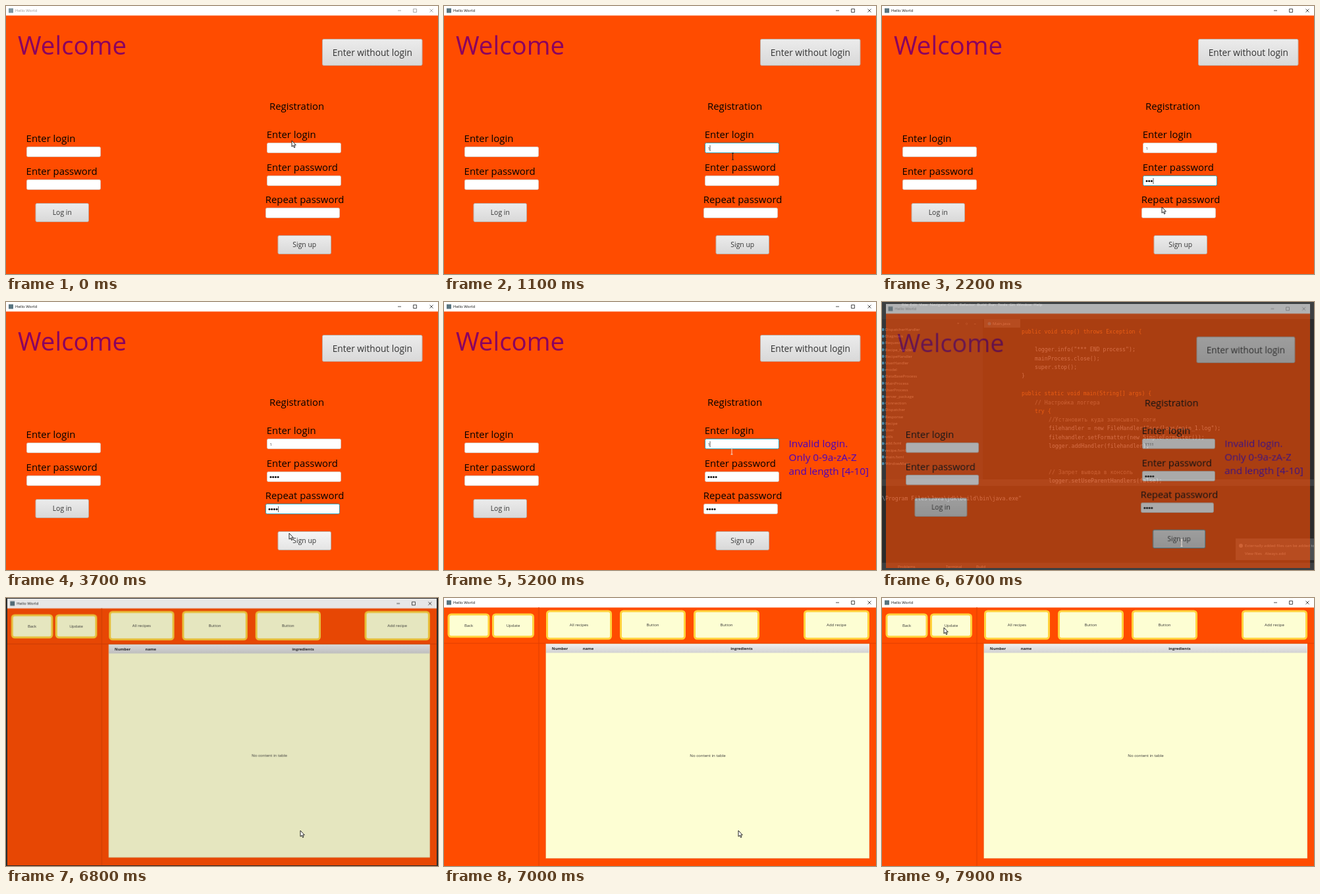
These frames come from a looping animation (656 by 408 pixels, 8000 ms). An HTML page with a canvas:

```html
<!DOCTYPE html>
<html lang="en">
<head>
<meta charset="utf-8">
<title>Hello World</title>
<style>
html, body { margin: 0; width: 100%; height: 100%; overflow: hidden; background: #2b2b2b; }
canvas { display: block; }
</style>
</head>
<body>
<canvas id="stage" width="656" height="408"></canvas>
<script>
const W = 656, H = 408, LOOP = 8000;
const stage = document.getElementById('stage').getContext('2d');
const sheet = document.createElement('canvas');
sheet.width = W;
sheet.height = H;
let g = stage;

const SANS = '"Open Sans", "Noto Sans", sans-serif';
const MONO = '"DejaVu Sans Mono", monospace';
const ORANGE = '#ff4c00', CREAM = '#fdfed3', DARK = '#2b2b2b';

// Pointer stops: time, x, y, shape (arrow, dark beam, light beam)
const PATH = [
  [0, 434, 205, 'arrow'], [300, 438, 216, 'dark'], [1000, 438, 216, 'dark'],
  [1300, 440, 266, 'dark'], [1900, 440, 266, 'arrow'], [2200, 425, 306, 'arrow'],
  [2500, 430, 316, 'dark'], [2700, 430, 316, 'arrow'], [3000, 446, 341, 'arrow'],
  [3200, 446, 341, 'arrow'], [3500, 430, 352, 'arrow'], [4100, 430, 352, 'arrow'],
  [4500, 436, 300, 'arrow'], [4900, 437, 217, 'dark'], [5100, 437, 217, 'dark'],
  [5200, 437, 227, 'light'], [5900, 437, 227, 'arrow'], [6300, 450, 365, 'arrow'],
  [6600, 450, 365, 'arrow'], [6700, 455, 367, 'light'], [6800, 447, 354, 'arrow'],
  [7200, 447, 354, 'arrow'], [7800, 94, 45, 'arrow'], [LOOP, 94, 45, 'arrow']
];

const FOCUS = [[500, 'login'], [1500, 'pass'], [2500, 'repeat'], [3800, 'sign'],
  [4900, 'login'], [6300, 'sign']];

const clamp = (v, a, b) => Math.max(a, Math.min(b, v));
const count = (t, start, step, max) => clamp(Math.floor((t - start) / step) + 1, 0, max);

function text(s, x, y, size, color = '#000', align = 'left', font = SANS, weight = '') {
  g.font = `${weight} ${size}px ${font}`;
  g.fillStyle = color;
  g.textAlign = align;
  g.fillText(s, x, y);
}

function rect(x, y, w, h, fill) {
  g.fillStyle = fill;
  g.fillRect(x, y, w, h);
}

function dot(x, y, r, fill) {
  g.beginPath();
  g.arc(x, y, r, 0, 7);
  g.fillStyle = fill;
  g.fill();
}

function box(x, y, w, h, r, fill, stroke, line = 1) {
  g.beginPath();
  g.roundRect(x + line / 2, y + line / 2, w - line, h - line, r);
  g.fillStyle = fill;
  g.fill();
  g.strokeStyle = stroke;
  g.lineWidth = line;
  g.stroke();
}

function shade(y, h, top, bottom) {
  const s = g.createLinearGradient(0, y, 0, y + h);
  s.addColorStop(0, top);
  s.addColorStop(1, bottom);
  return s;
}

function titleBar(active) {
  rect(0, 0, W, 14.5, '#fff');
  rect(4, 3.5, 7, 7, active ? '#587480' : '#7d959f');
  text('Hello World', 14, 9.4, 6.1, active ? '#111' : '#999');
  g.strokeStyle = active ? '#222' : '#999';
  g.lineWidth = 0.8;
  g.beginPath();
  g.moveTo(595, 7); g.lineTo(600, 7);
  g.rect(618.5, 4.5, 5, 5);
  g.moveTo(643.5, 4.5); g.lineTo(648.5, 9.5);
  g.moveTo(648.5, 4.5); g.lineTo(643.5, 9.5);
  g.stroke();
}

function button(label, x, y, w, h, size, focused, lit) {
  box(x, y, w, h, 2, lit ? shade(y, h, '#f6f6f6', '#e4e4e4') : shade(y, h, '#ececec', '#d8d8d8'),
    focused ? '#5c9db0' : '#c0aca0');
  text(label, x + w / 2, y + h / 2 + size * 0.37, size, '#333', 'center');
}

function field(x, y, focused, value = '', dots = 0) {
  box(x, y, 113, 16, 2, '#fff', focused ? '#2c9fb5' : '#dcc2b4');
  text(value, x + 4.5, y + 10.5, 6, '#333');
  for (let i = 0; i < dots; i++) dot(x + 6 + i * 3.7, y + 8.6, 1.5, '#111');
  if (focused) rect(x + 4.5 + value.length * 3.1 + dots * 3.7, y + 4, 0.8, 9, '#333');
}

function loginScreen(t) {
  const focus = (FOCUS.filter(f => f[0] <= t).pop() || [])[1];
  const label = (s, x, y) => text(s, x, y, 14.9);
  const typed = t < 900 ? 0 : t < 5500 ? 1 : 1 + count(t, 5500, 150, 3);

  rect(0, 0, W, H, ORANGE);
  titleBar(t >= 500 && t < 6700);
  text('Welcome', 18, 73.6, 38.5, '#8a0060');
  button('Enter without login', 480, 50, 152.5, 41, 13.7);

  label('Enter login', 30.6, 207);
  field(31, 214);
  label('Enter password', 30.6, 257);
  field(31, 264);
  button('Log in', 44.5, 300, 81.5, 29, 10.4);

  label('Registration', 400, 158);
  label('Enter login', 395.8, 201);
  field(396, 208, focus === 'login', '1'.repeat(typed));
  label('Enter password', 395.8, 251);
  field(396, 258, focus === 'pass', '', count(t, 1700, 200, 4));
  label('Repeat password', 393.8, 300);
  field(394, 307, focus === 'repeat', '', count(t, 2700, 100, 4));
  const over = (t >= 3400 && t < 4200) || (t >= 6200 && t < 6700);
  button('Sign up', 412.5, 349, 81.5, 29, 10.4, focus === 'sign', over);

  if (t >= 3900) {
    ['Invalid login.', 'Only 0-9a-zA-Z', 'and length [4-10]']
      .forEach((s, i) => text(s, 523.5, 221 + i * 21.1, 15.3, '#4800c0'));
  }
}

function recipeScreen() {
  rect(0, 0, W, H, ORANGE);
  titleBar(true);
  rect(0, 68.5, W, 1, '#e23f00');
  rect(143.5, 14, 1, H, '#e23f00');
  const tab = (s, x, y, w, h) => {
    box(x, y, w, h, 4, CREAM, '#ffd23c', 3);
    text(s, x + w / 2, y + h / 2 + 2.2, 6, '#333', 'center');
  };
  tab('Back', 5.5, 23.5, 64, 37);
  tab('Update', 73, 23.5, 64, 37);
  tab('All recipes', 155, 18.5, 100, 45);
  tab('Button', 267, 18.5, 100, 45);
  tab('Button', 379, 18.5, 100, 45);
  tab('Add recipe', 546, 18.5, 100, 45);

  rect(154.5, 69.5, 491.5, 327, '#e0cfa0');
  rect(155, 70, 490.5, 326, CREAM);
  rect(155, 70, 490.5, 13.5, shade(70, 13.5, '#f0f0f0', '#d2d2d2'));
  const head = (s, x) => text(s, x, 79.3, 5.9, '#222', 'center', SANS, 'bold');
  head('Number', 176);
  head('name', 219);
  head('ingredients', 452);
  text('No content in table', 400.5, 241.5, 6.1, '#333', 'center');
}

// Code editor seen while the windows swap
function editor() {
  const key = '#cc7832', note = '#808080', plain = '#9aa4b0';
  const code = (s, x, y, c = plain) => text(s, x, y, 8.2, c, 'left', MONO);
  const small = (s, x, y) => text(s, x, y, 6, '#aaa');

  rect(0, 0, W, H, DARK);
  rect(0, 0, W, 26, '#3c3f41');
  rect(0, 26, 153, 244, '#33363a');
  rect(0, 270, W, 10, '#3c3f41');
  rect(0, 397, W, 11, '#3c3f41');
  small('File  Edit  View  Navigate  Code  Refactor  Build  Run  Tools  Git  Window  Help', 30, 6);
  small('÷      ○      –', 114, 35);
  rect(155, 26, 55, 13, '#4a4e52');
  dot(163, 33, 2.5, '#4a88a8');
  small('Main.java', 168, 35);
  ['DispatcherHandler', 'Diagnosis', 'Request', 'Recipe_handler', 'RecipeHandler', 'UserHandler', 'model',
    'DataBaseProcess', 'MainProcess', 'UserProcess', 'server_package', 'Connection', 'Dispatcher',
    'Response', 'Recipe', 'User', 'utils', 'add.fxml', 'recipe.fxml', 'main.fxml', 'WindowMain']
    .forEach((s, i) => {
      dot(1.5, 42 + i * 10.2, 2.2, '#4a88a8');
      small(s, 5, 44 + i * 10.2);
    });

  code('public void stop() throws Exception {', 212, 48, key);
  code('logger.info("*** END process");', 232, 75);
  code('mainProcess.close();', 232, 88.5);
  code('super.stop();', 232, 102);
  code('}', 212, 115);
  code('public static void main(String[] args) {', 212, 142, key);
  code('// Настройка логгера', 232, 155.5, note);
  code('try {', 232, 168.5, key);
  code('//Установить куда записывать логи', 253, 181.5, note);
  code('filehandler = new FileHandler("src/logs/main_1.log");', 253, 195);
  code('filehandler.setFormatter(new SimpleFormatter());', 253, 208.5);
  code('logger.addHandler(filehandler);', 253, 221.5);
  code('// Запрет вывода в консоль', 253, 261.5, note);
  code('logger.setUseParentHandlers(false);', 253, 275);
  code('\\Program Files\\Java\\jdk\\build\\bin\\java.exe"', 0, 302);

  small('Problems', 24, 405);
  small('Terminal', 97, 405);
  small('Build', 143, 405);
  rect(537, 360, 119, 33, '#4b4f52');
  dot(545, 371, 3, '#888');
  small('Externally added files can be added to', 551, 373);
  small('View files   Always add', 551, 385);
}

// Draw a screen on the sheet, then lay it down faded and scaled about the centre
function windowAt(alpha, scale, draw) {
  g = sheet.getContext('2d');
  draw();
  g = stage;
  const w = W * scale, h = H * scale;
  g.globalAlpha = alpha;
  g.drawImage(sheet, (W - w) / 2, (H - h) / 2, w, h);
  g.globalAlpha = 1;
}

function pointer(t) {
  const i = PATH.findLastIndex(p => p[0] <= t);
  const [t0, x0, y0, shape] = PATH[i], [t1, x1, y1] = PATH[i + 1];
  let k = (t - t0) / (t1 - t0);
  k = k * k * (3 - 2 * k);
  const x = x0 + (x1 - x0) * k, y = y0 + (y1 - y0) * k;
  g.beginPath();
  if (shape === 'arrow') {
    [[0, 0], [0, 9.2], [2.1, 7.3], [3.5, 10.6], [5, 10], [3.6, 6.8], [6.3, 6.8]]
      .forEach(([a, b]) => g.lineTo(x + a, y + b));
    g.closePath();
    g.fillStyle = '#fff';
    g.fill();
    g.strokeStyle = '#111';
    g.lineWidth = 0.9;
  } else {
    g.moveTo(x - 1.5, y - 5); g.lineTo(x + 1.5, y - 5);
    g.moveTo(x, y - 5); g.lineTo(x, y + 5);
    g.moveTo(x - 1.5, y + 5); g.lineTo(x + 1.5, y + 5);
    g.strokeStyle = shape === 'dark' ? '#222' : '#f0e4dc';
    g.lineWidth = 1;
  }
  g.stroke();
}

function frame(now) {
  const t = Math.floor(now % LOOP / 100) * 100;
  if (t < 6700) {
    loginScreen(t);
  } else if (t < 6800) {
    editor();
    windowAt(0.6, 0.983, () => loginScreen(t));
  } else if (t < 7000) {
    rect(0, 0, W, H, DARK);
    if (t < 6900) windowAt(0.89, 0.993, recipeScreen);
    else windowAt(0.98, 0.999, recipeScreen);
  } else {
    recipeScreen();
  }
  pointer(t);
  requestAnimationFrame(frame);
}
requestAnimationFrame(frame);
</script>
</body>
</html>
```
